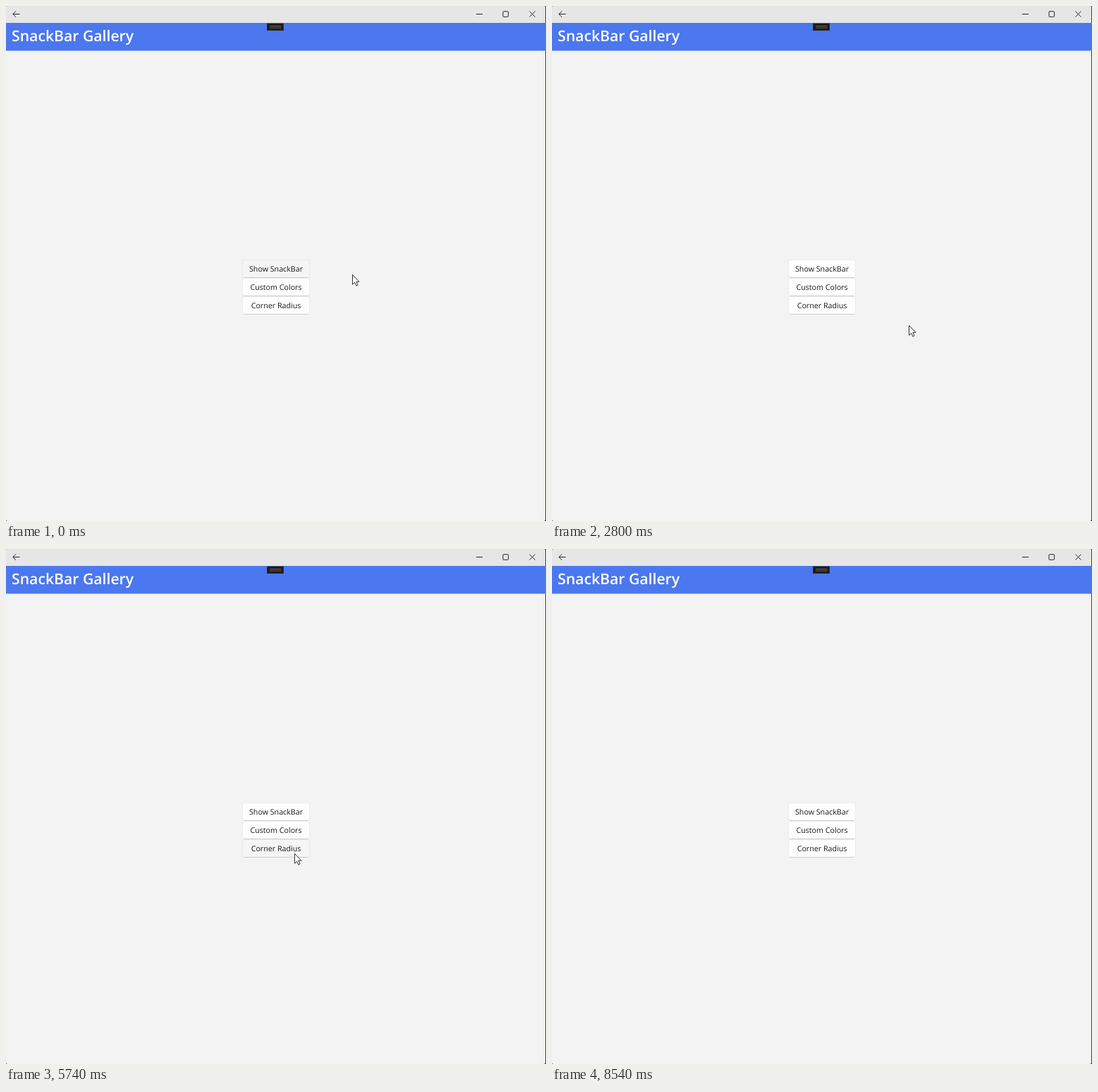
An HTML page that plays this animation: 766x731 px, repeating every 8890 ms.

```html
<!DOCTYPE html>
<html lang="en">
<head>
<meta charset="utf-8">
<title>SnackBar Gallery</title>
<style>
  html, body { margin: 0; width: 100%; height: 100%; overflow: hidden; background: #3c3c3c; }
  svg { display: block; width: 100vw; height: 100vh; }
  text { font-family: "Open Sans", "Noto Sans", sans-serif; text-rendering: geometricPrecision; }
  .title { font-size: 21.2px; font-weight: 600; fill: #fff; }
  .label { font-size: 10.7px; text-anchor: middle; }
  .message { font-size: 9.25px; fill: #fff; stroke: #fff; stroke-width: .2; }
  .action { font-size: 9.3px; font-weight: 700; fill: #fff; }
  .icon { fill: none; stroke: #1c1c1c; stroke-width: .95; }
</style>
</head>
<body>
<svg viewBox="0 0 766 731" preserveAspectRatio="none">
  <rect width="765" height="731" rx="2" fill="#f3f3f3"/>
  <rect width="765" height="30" rx="2" fill="#e6e6e6"/>
  <rect y="24" width="766" height="39.5" fill="#4b77ef"/>
  <path class="icon" d="M19.5 11.5H10M14 7.3L9.8 11.5L14 15.7M667 11.5H676M742.5 7.5L750.5 15.5M750.5 7.5L742.5 15.5"/>
  <rect class="icon" x="705" y="7.7" width="7.6" height="7.6" rx="1"/>
  <text class="title" x="8" y="49.8">SnackBar Gallery</text>
  <rect x="370.5" y="25" width="23" height="9.5" fill="#1d1b16" stroke="#352d1c"/>
  <path d="M374 28.5H390.5M374 31H390.5" stroke="#6b675c"/>
  <g id="buttons"></g>
  <g id="bar">
    <rect id="panel"/>
    <text id="message" class="message">Lorem ipsum dolor sit amet, consectetur adipiscing elit.</text>
    <text id="action" class="action">Close</text>
  </g>
  <path id="cursor" d="M.5 .5V14.3L3.7 11.3L5.8 16.1L8 15.1L5.9 10.4H10Z"
        fill="#fff" stroke="#1a1a1a" stroke-width=".9" stroke-linejoin="round"/>
</svg>
<script>
const LOOP = 8890, STEP = 70;
const NS = "http://www.w3.org/2000/svg";
const byId = id => document.getElementById(id);

function set(el, attrs) {
  for (const name in attrs) el.setAttribute(name, attrs[name]);
}
function add(parent, tag, attrs) {
  const el = parent.appendChild(document.createElementNS(NS, tag));
  set(el, attrs);
  return el;
}

// Where the pointer goes: arrival time, x, y, time it rests there
const stops = [
  [-70, 420, 380], [0, 491, 381], [70, 537, 391, 70],
  [770, 405, 374, 210], [1050, 390, 433], [1260, 340, 538, 70], [2170, 737, 718, 420],
  [2800, 506, 453], [3500, 412, 401, 210], [4270, 762, 740, 280], [4900, 735, 722, 140],
  [5670, 409, 432, 420], [6860, 698, 727], [7490, 723, 701, 770], [8540, 640, 735]
];
const path = stops.flatMap(([t, x, y, rest]) =>
  rest ? [[t, x, y], [t + rest, x, y]] : [[t, x, y]]);

// Each button opens one bar
const wide = { x: 1, y: 706.3, width: 763, height: 24.7, rx: 0 };
const inset = { x: 10.5, y: 686, width: 744.5, height: 27, rx: 7 };
const demos = [
  { label: "Show SnackBar", fill: "#000", box: wide, show: 1050, hide: 2380 },
  { label: "Custom Colors", fill: "#20b2aa", box: wide, show: 3780, hide: 5040 },
  { label: "Corner Radius", fill: "#ff4500", box: inset, show: 6090, hide: 7980 }
];
const face = { x: 335, y: 360, width: 96, height: 26 };

// Slope at a point of the path, flat at rests and turning points
function slope(i, axis) {
  if (i === 0 || i === path.length - 1) return 0;
  const rate = k => (path[k + 1][axis] - path[k][axis]) / (path[k + 1][0] - path[k][0]);
  const a = rate(i - 1), b = rate(i);
  return a * b <= 0 ? 0 : 2 * a * b / (a + b);
}

function pointer(t) {
  const next = path.findIndex(key => key[0] > t);
  if (next < 0) return path[path.length - 1].slice(1);
  const p = path[next - 1], q = path[next];
  const d = q[0] - p[0], u = (t - p[0]) / d, v = 1 - u;
  return [1, 2].map(axis => Math.round(
    p[axis] * (1 + 2 * u) * v * v + q[axis] * u * u * (3 - 2 * u)
    + d * u * v * (slope(next - 1, axis) * v - slope(next, axis) * u)));
}

for (const [i, demo] of demos.entries()) {
  const g = byId("buttons"), y = demo.top = face.y + i * face.height;
  add(g, "rect", { ...face, y, rx: 4, fill: "#e6e6e6" });
  add(g, "path", { d: `M338 ${y + 25.5}H428`, stroke: "#ccc" });
  demo.face = add(g, "rect", { x: face.x + .8, y: y + .8, width: 94.4, height: 24.3, rx: 3.3 });
  demo.text = add(g, "text", { class: "label", x: 383, y: y + 16.9 });
  demo.text.textContent = demo.label;
}

function drawButton(demo, t) {
  const [x, y] = pointer(t - STEP);
  const hover = x >= face.x && x < face.x + face.width
    && y >= demo.top && y < demo.top + face.height;
  const press = t >= demo.show - 2 * STEP && t < demo.show - STEP;
  set(demo.face, { fill: hover ? "#f5f5f5" : "#fefefe" });
  set(demo.text, { fill: press ? "#777" : "#1b1b1b" });
}

function drawBar(t) {
  const demo = demos.find(d => t >= d.show && t < d.hide + 2 * STEP);
  set(byId("bar"), { visibility: demo ? "visible" : "hidden" });
  if (!demo) return;
  const { box } = demo;
  const leave = Math.max(0, (t - demo.hide + STEP) / (3 * STEP));
  const base = box.y + 17.6;
  set(byId("bar"), { transform: `translate(0 ${(731 - box.y) * leave ** 2})` });
  set(byId("panel"), { ...box, fill: demo.fill });
  set(byId("message"), { x: box.x + 14.2, y: base });
  set(byId("action"), { x: box.x + box.width - 37, y: base - .6 });
}

function draw(t) {
  demos.forEach(demo => drawButton(demo, t));
  drawBar(t);
  set(byId("cursor"), { transform: `translate(${pointer(t)})` });
}

const start = performance.now();
function tick(now) {
  const t = Math.max(0, now - start) % LOOP;
  draw(Math.floor(t / STEP) * STEP);
  requestAnimationFrame(tick);
}
draw(0);
requestAnimationFrame(tick);
</script>
</body>
</html>
```
